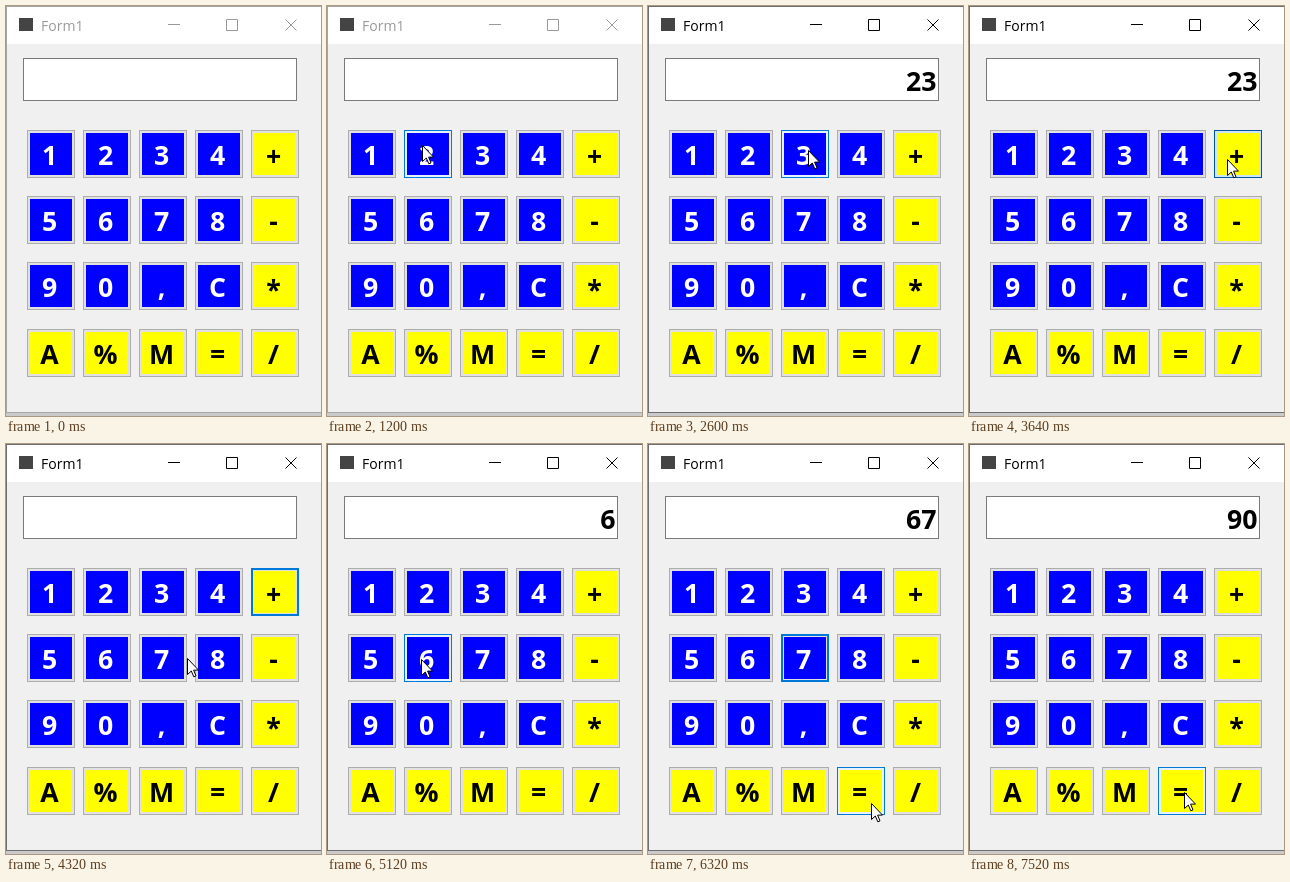
These frames come from a looping animation (315x410 px, 8000 ms). An HTML page:

```html
<!DOCTYPE html>
<html lang="en">
<head>
<meta charset="utf-8">
<title>Form1</title>
<style>
  html, body { margin: 0; width: 100%; height: 100%; overflow: hidden; background: #cacaca; }
  svg { display: block; width: 315px; height: 410px; font-family: "Open Sans", "Noto Sans", sans-serif; }
  .crisp, .key rect { shape-rendering: crispEdges; }
  .frame { fill: #a6a6a6; }
  .title { font-size: 14px; fill: #999; }
  .sys { fill: none; stroke: #999; }
  .active .frame { fill: #6e6e6e; }
  .active .title { fill: #000; }
  .active .sys { stroke: #000; }
  .key text, #display { font-weight: 700; font-size: 26.67px; }
  .key text { text-anchor: middle; }
  #display { text-anchor: end; }
  .edge, .line { fill: #adadad; }
  .line, .ring { fill: #e1e1e1; }
  .focus .edge, .focus .line { fill: #0078d7; }
  .hover .edge { fill: #0078d7; }
  .hover .line, .hover .ring { fill: #e5f1fb; }
  .press .edge { fill: #005499; }
  .press .line, .press .ring { fill: #cce4f7; }
</style>
</head>
<body>
<svg id="stage" viewBox="0 0 315 410">
  <g class="crisp">
    <rect y="407" width="315" height="3" fill="#cacaca"/>
    <rect class="frame" width="315" height="407"/>
    <rect x="1" y="1" width="314" height="37" fill="#fff"/>
    <rect x="1" y="38" width="314" height="368" fill="#f0f0f0"/>
    <rect x="13" y="12" width="14" height="13" fill="#444"/>
    <rect x="17" y="52" width="274" height="43" fill="#7a7a7a"/>
    <rect x="18" y="53" width="272" height="41" fill="#fff"/>
  </g>
  <text class="title" x="35" y="25">Form1</text>
  <path class="sys" d="M162 18.5h12M220.5 13.5h11v11h-11zM279.500 13.500l11 11M290.500 13.500l-11 11"/>
  <text id="display" x="288.500" y="85"></text>
  <g id="keys"></g>
  <path id="cursor" fill="#fff" stroke="#000" d="M.5 .5V16.500L4.300 13 6.800 18.800 9 17.900 6.600 12.100H11.500Z"/>
</svg>
<script>
const LOOP = 8000, STEP = 80, SIZE = 48;
const stage = document.getElementById('stage');
const display = document.getElementById('display');
const cursor = document.getElementById('cursor');
const rows = ['1234+', '5678-', '90,C*', 'A%M=/'];
const tops = [124, 190, 256, 323];

const svg = (tag, attrs, parent) => {
  const el = document.createElementNS('http://www.w3.org/2000/svg', tag);
  for (const name in attrs) el.setAttribute(name, attrs[name]);
  return parent.appendChild(el);
};

const box = (x, y, inset, attrs, parent) => svg('rect', {
  x: x + inset, y: y + inset, width: SIZE - 2 * inset, height: SIZE - 2 * inset, ...attrs
}, parent);

const keys = [];
rows.forEach((row, r) => [...row].forEach((label, c) => {
  const x = 21 + 56 * c, y = tops[r];
  const blue = r < 3 && c < 4;
  const el = svg('g', { class: 'key' }, document.getElementById('keys'));
  box(x, y, 0, { class: 'edge' }, el);
  box(x, y, 1, { class: 'line' }, el);
  box(x, y, 2, { class: 'ring' }, el);
  box(x, y, 3, { fill: blue ? '#00f' : '#ff0' }, el);
  const drop = label === '*' ? 2 : label === '+' ? 1 : 0;
  svg('text', { x: x + 22.5, y: y + 35 + drop, fill: blue ? '#fff' : '#000' }, el).textContent = label;
  keys.push({ el, label, x, y });
}));

// Pointer moves: start, end, target, optional Bezier controls
const moves = [
  [280, 1080, [90, 162]],
  [1160, 1200, [95, 139]],
  [1600, 1920, [155, 139]],
  [2080, 2080, [159, 139]],
  [2600, 3400, [258, 153], [154, 153], [240, 240]],
  [3960, 4720, [92, 227], [235, 205], [130, 238]],
  [5040, 5120, [94, 215]],
  [5160, 5560, [173, 210]],
  [5840, 6320, [223, 359]],
  [6520, 6600, [215, 360]],
  [7280, 7360, [201, 348]],
  [7520, 7520, [215, 348]]
];

// Clicks: press, release, key, text shown afterwards
const clicks = [
  [1440, 1520, '2', '2'],
  [2320, 2440, '3', '23'],
  [3640, 3680, '+', ''],
  [4800, 4920, '6', '6'],
  [5640, 5800, '7', '67'],
  [6680, 6800, '=', '90']
];

const bezier = (a, b, c, d, u) => {
  const v = 1 - u;
  return v * v * v * a + 3 * v * v * u * b + 3 * v * u * u * c + u * u * u * d;
};

function pointerAt(t) {
  let pos = [191, 410];
  for (const [start, end, to, c1, c2] of moves) {
    if (t < start) break;
    const count = Math.floor((end - start) / STEP) + 1;
    const u = t >= end ? 1 : Math.min(1, (Math.floor((t - start) / STEP) + 1) / count);
    const from = pos;
    pos = to.map((p, i) => {
      const d = (p - from[i]) / 3;
      return Math.round(bezier(from[i], c1 ? c1[i] : from[i] + d, c2 ? c2[i] : p - d, p, u));
    });
    if (t < end) break;
  }
  return pos;
}

function render(t) {
  const [px, py] = pointerAt(t);
  const visible = t >= moves[0][0];
  let focus = '', pressed = '', text = '';
  for (const [down, up, label, result] of clicks) {
    if (t < down) break;
    focus = label;
    pressed = t < up ? label : '';
    if (t >= up) text = result;
  }
  stage.classList.toggle('active', t >= clicks[0][0]);
  display.textContent = text;
  cursor.setAttribute('visibility', visible ? 'visible' : 'hidden');
  cursor.setAttribute('transform', `translate(${px} ${py})`);
  for (const { el, label, x, y } of keys) {
    const over = visible && px >= x && px < x + SIZE && py >= y && py < y + SIZE;
    const state = label === pressed ? ' press' : over ? ' hover' : label === focus ? ' focus' : '';
    el.setAttribute('class', 'key' + state);
  }
}

const begin = performance.now();
function tick() {
  render((performance.now() - begin) % LOOP);
  requestAnimationFrame(tick);
}
tick();
</script>
</body>
</html>
```
